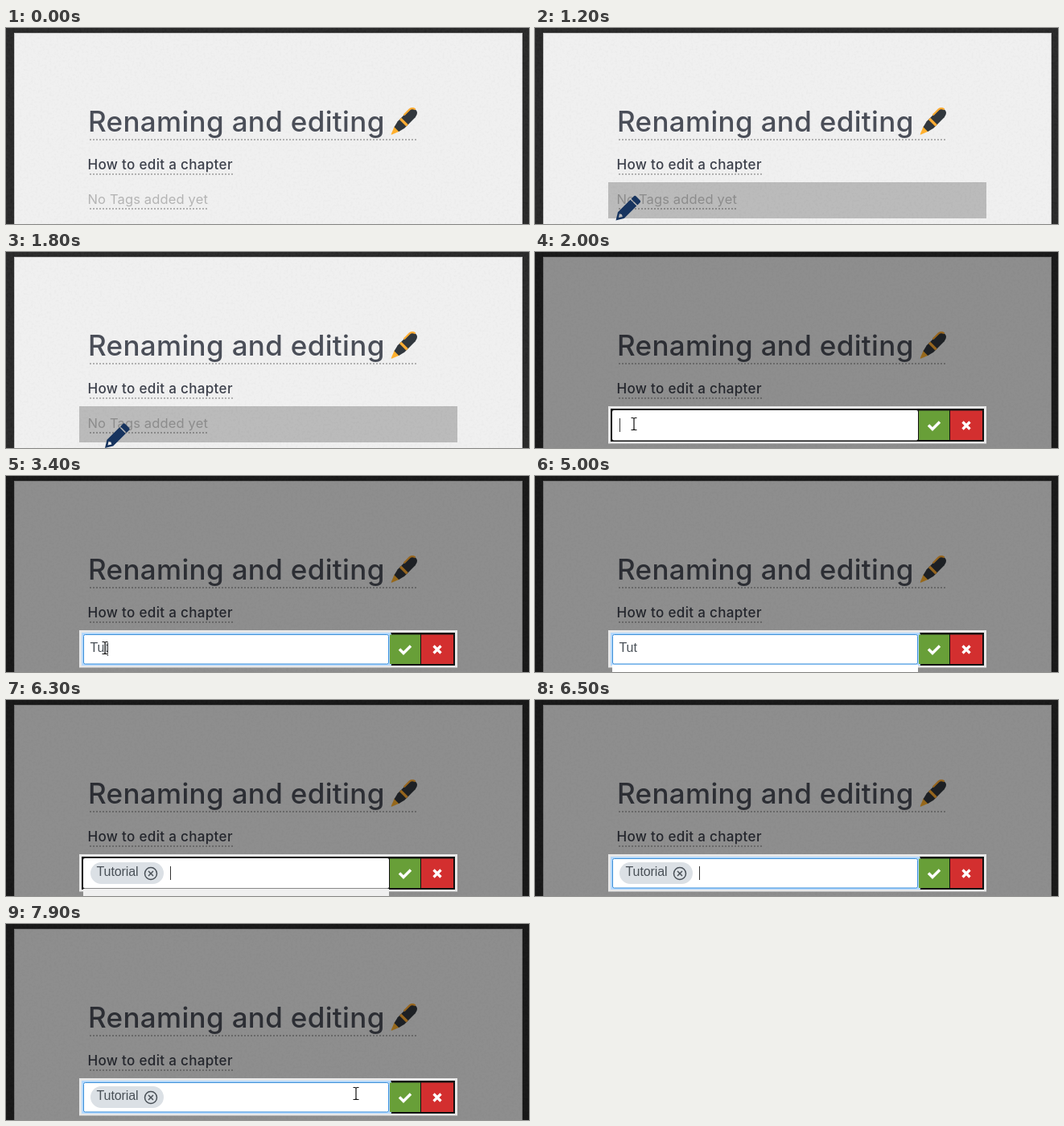
Write an HTML page that moves like this. It is 650 by 244 pixels and loops after 8 s.

```html
<!DOCTYPE html>
<html lang="en">
<head>
<meta charset="utf-8">
<title>Editing tags</title>
<style>
html, body { margin: 0; width: 100%; height: 100%; overflow: hidden; background: #2a2a2a; }
svg { display: block; width: 650px; height: 244px; }
.head { font-family: Inter, "Open Sans", sans-serif; font-weight: 500; }
.field { font: 16px "Liberation Sans", Arial, sans-serif; letter-spacing: -.1px; fill: #495057; }
.dots { stroke: #b0b0b0; stroke-width: 2; stroke-dasharray: 2 2; }
</style>
</head>
<body>
<svg viewBox="0 0 650 244">
  <defs>
    <filter id="grain" x="0" y="0" width="1" height="1">
      <feTurbulence type="fractalNoise" baseFrequency=".35" numOctaves="2" seed="4"/>
      <feColorMatrix values="0 0 0 0 0  0 0 0 0 0  0 0 0 0 0  .9 0 0 0 -.36"/>
    </filter>
    <clipPath id="inner"><rect x="94" y="195" width="464" height="41"/></clipPath>
  </defs>

  <rect width="650" height="244" fill="#2d2d2d"/>
  <rect width="650" height="244" filter="url(#grain)" opacity=".4"/>
  <rect x="10.5" y="6.5" width="631" height="245" fill="#f0f0f0" stroke="#c4c4c4"/>
  <rect x="10" y="6" width="632" height="238" filter="url(#grain)" opacity=".05"/>

  <text class="head" x="102" y="129" font-size="35" letter-spacing=".33" fill="#4a4e58">Renaming and editing</text>
  <path class="dots" d="M104 139H510"/>
  <g transform="translate(479 132.5) rotate(-45)">
    <path d="M0-.5L10-4.500V4.500L0 .5Z" fill="#ffb02e"/>
    <path d="M9-4L17-6H36Q43-5 43 0T36 6H17L9 4Z" fill="#31373d"/>
    <path d="M20-6h3.500v12H20Z" fill="#ffac33"/>
    <path d="M28-6H38Q42-5.500 43-1" fill="none" stroke="#ffac33" stroke-width="2.200"/>
  </g>
  <text class="head" x="101.500" y="176" font-size="17" letter-spacing=".33" fill="#3b3f4a">How to edit a chapter</text>
  <path class="dots" d="M104 182H282"/>
  <g id="empty">
    <text class="head" x="101.500" y="219" font-size="16.500" letter-spacing=".15" style="font-weight:400" fill="#b4b4b4">No Tags added yet</text>
    <path class="dots" d="M104 225H251"/>
  </g>
  <rect id="hover" x="91" y="192" width="470" height="45" opacity=".225"/>

  <g id="editor">
    <rect width="650" height="244" opacity=".41"/>
    <rect x="91" y="192" width="470" height="46.5" fill="#e8e8e8"/>
    <rect x="94" y="195" width="464" height="41" fill="#111"/>
    <rect x="96" y="197" width="380" height="37.500" rx="2" fill="#fff"/>
    <g id="glow" clip-path="url(#inner)">
      <rect x="93" y="194" width="386" height="44" rx="4" fill="#b5d9ff"/>
      <rect x="96.500" y="197.500" width="379" height="36.500" rx="2" fill="#fff" stroke="#3a8fd8"/>
    </g>
    <rect x="477" y="197.500" width="38" height="36.500" fill="#689f38"/>
    <path d="M489 215.500l5 5 9-9" fill="none" stroke="#fff" stroke-width="3.500"/>
    <rect x="516" y="197.500" width="40" height="36.500" fill="#d32f2f"/>
    <path d="M531.500 211.500l9 9m0-9l-9 9" stroke="#fff" stroke-width="3.300"/>
    <rect id="list" x="96" y="235" width="380" height="9"/>
    <text id="typed" class="field" x="104.500" y="219"></text>
    <g id="chip">
      <rect x="105" y="202" width="91" height="27" rx="13.500" fill="#dbe0e5"/>
      <text class="field" x="112.500" y="219">Tutorial</text>
      <g fill="none" stroke="#495057" stroke-width="1.500">
        <circle cx="180" cy="216" r="7.500"/>
        <path d="M177 213l6 6m0-6l-6 6"/>
      </g>
    </g>
    <rect id="caret" y="207" width="1" height="17" fill="#333"/>
  </g>

  <path id="arrow" d="M0 0V16L4 12.500 7 19 9.500 18 6.500 11.500H12Z" fill="#111" stroke="#fff"/>
  <g id="pencil">
    <g transform="translate(0 31) rotate(-45)" fill="#17345f">
      <path fill-rule="evenodd" d="M0 0L9-5.500H31V5.500H9ZM5 0L9 2.700 10.500 0 9-2.700Z"/>
      <path d="M32.500-5.500H37Q39-5.500 39-3.500V3.500Q39 5.500 37 5.500H32.500Z"/>
    </g>
  </g>
  <g id="beam" fill="none">
    <g stroke="#fff" stroke-width="3"><path id="bar" stroke="inherit" d="M-3.500-7.500H-1.500Q0-7.500 0-6 0-7.500 1.500-7.500H3.500M0-6V6M-3.500 7.500H-1.500Q0 7.500 0 6 0 7.500 1.500 7.500H3.500"/></g>
    <use href="#bar" stroke="#111" stroke-width="1.200"/>
  </g>
</svg>
<script>
const LOOP = 8000, TICK = 100;
const $ = id => document.getElementById(id);
const set = (id, name, value) => $(id).setAttribute(name, value);
const show = (id, on) => set(id, "visibility", on ? "visible" : "hidden");
const within = (t, a, b) => t >= a && t < b;
const ramp = (t, a, b) => Math.min(1, Math.max(0, (t - a) / (b - a)));

// Pointer path: time, x, y
const path = [[600, -14, 180], [1100, 92, 206], [1500, 126, 216], [1600, 126, 216],
  [1800, 123, 213], [2000, 123, 214], [4600, 123, 214], [5000, 140, 262],
  [7700, 390, 254], [7800, 408, 229], [7900, 435, 211], [8000, 435, 211]];

function pointer(t) {
  const i = Math.max(1, path.findIndex(p => p[0] >= t));
  const [a, b] = [path[i - 1], path[i]], k = ramp(t, a[0], b[0]);
  return [a[1] + (b[1] - a[1]) * k, a[2] + (b[2] - a[2]) * k];
}

function draw(t) {
  const editing = t >= 2000, picked = t >= 6200;
  const [x, y] = pointer(t);
  const over = x > 91 && y > 192;
  const kind = editing ? "beam" : over ? "pencil" : "arrow";
  for (const id of ["arrow", "pencil", "beam"]) {
    show(id, id === kind);
    set(id, "transform", `translate(${x} ${y})`);
  }
  show("hover", over && !editing);
  show("empty", !editing);
  set("editor", "display", editing ? "inline" : "none");

  set("glow", "opacity", picked ? ramp(t, 6300, 6500) : ramp(t, 2000, 2200));
  const text = picked ? "" : "Tut".slice(0, (t >= 3000) + (t >= 3200) + (t >= 3400));
  $("typed").textContent = text;
  show("chip", picked);
  set("caret", "x", picked ? 204 : [105, 114, 122, 126][text.length]);
  show("caret", !within(t, 4500, 5700) && t < 7500);
  show("list", within(t, 3700, 6500));
  set("list", "fill", picked ? "#efefef" : "#fff");
  set("list", "opacity", picked ? 1 - ramp(t, 6300, 6500) : ramp(t, 3600, 3800));
}

function frame() {
  draw(Math.floor(performance.now() % LOOP / TICK) * TICK);
  requestAnimationFrame(frame);
}
frame();
</script>
</body>
</html>
```
